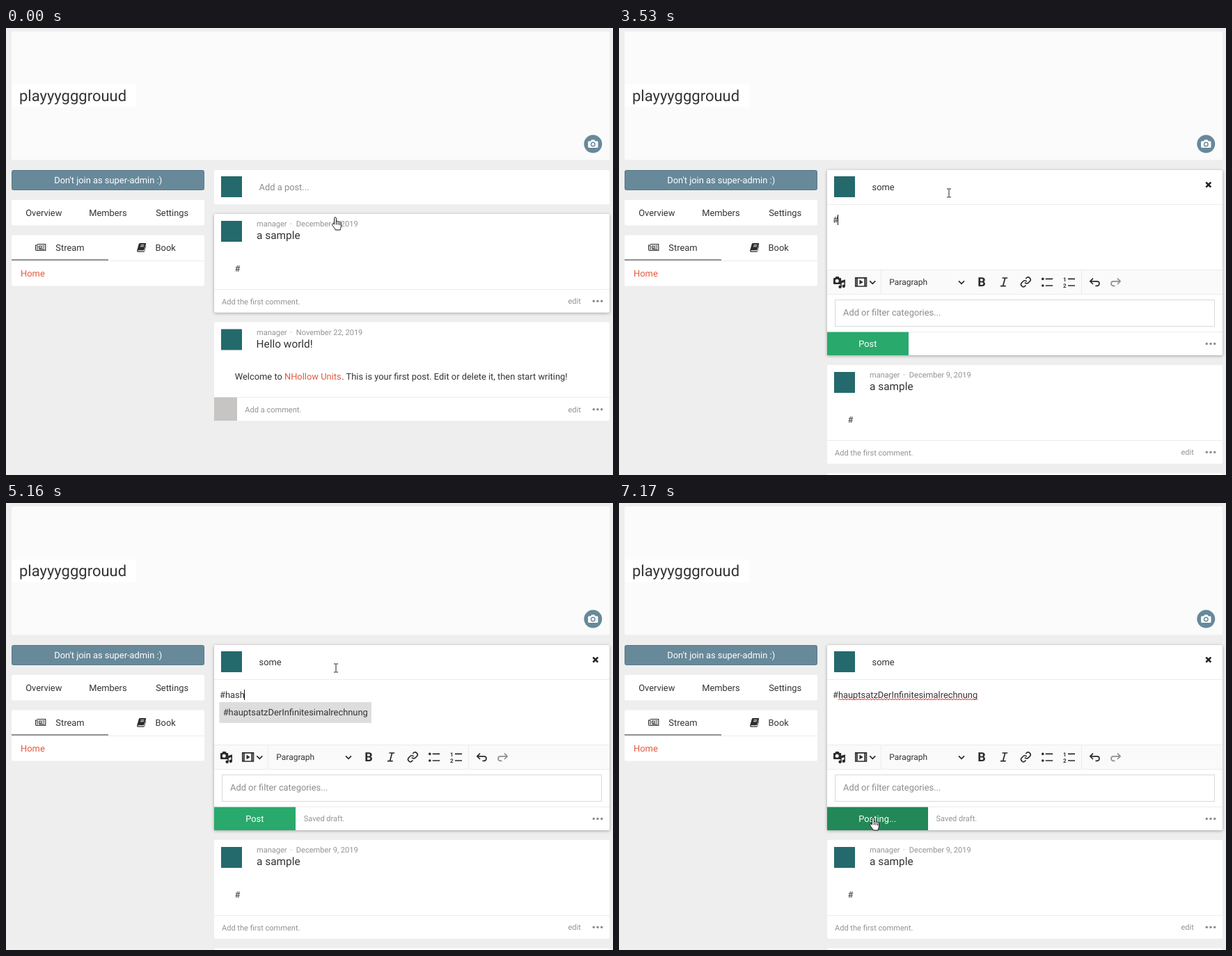
Animation, 872 px wide and 642 px high, one loop 8000 ms. Source, as an HTML page:

```html
<!DOCTYPE html>
<html lang="en">
<head>
<meta charset="utf-8">
<title>Posting with a hashtag</title>
<style>
html, body { margin: 0; width: 100%; height: 100%; overflow: hidden; background: #eee; }
svg { display: block; width: 872px; height: 642px; }
text { font: 12.88px Roboto, "Open Sans", sans-serif; fill: #333; text-rendering: geometricPrecision; white-space: pre; }
.small { font-size: 11.04px; fill: #939393; }
.head { font-size: 15.4px; }
.hint { fill: #8c8c8c; }
.mid { text-anchor: middle; }
.on-dark { fill: #fff; }
.link { fill: #e4593c; }
.card { fill: #fff; }
.raised { filter: drop-shadow(0 1px 2px rgba(0, 0, 0, .32)); }
.rule { fill: #ececec; }
.logo { fill: #24696b; }
.dots { fill: #8a8a8a; }
.icon { fill: none; stroke: #2b2b2b; stroke-width: 1.7; }
.solid { fill: #2b2b2b; }
.off { stroke: #8f8f8f; }
</style>
</head>
<body>
<svg viewBox="0 0 872 642">
  <defs>
    <g id="dots" class="dots"><circle cx="844.3" r="1.7"/><circle cx="850" r="1.7"/><circle cx="855.7" r="1.7"/></g>
    <path id="chevron" class="icon" d="M-4-2L0 2L4-2"/>
    <path id="turn" d="M681 359.6L676.9 363.8L681 368M677 363.8H686.5c4.6 0 4.6 6.6 0 6.6H684.5"/>
    <g id="byline">
      <rect class="logo" x="309" y="277" width="30" height="30"/>
      <text class="small" x="360" y="285">manager</text>
      <text class="small" x="408" y="285">·</text>
    </g>
  </defs>
  <rect width="872" height="642" fill="#eee"/>

  <!-- banner -->
  <rect x="8" y="5" width="859" height="184.5" rx="2" fill="#fbfbfb"/>
  <rect class="card" x="8" y="81" width="179" height="33"/>
  <text x="19" y="105" style="font-size:22px">playyygggrouud</text>
  <circle cx="843.3" cy="166.6" r="13" fill="#67899a"/>
  <path fill="#fff" d="M837.5 162.5h2.5l1.2-2h4.2l1.2 2h2.5q1.4 0 1.4 1.4v6.7q0 1.4-1.4 1.4h-11.6q-1.4 0-1.4-1.4v-6.7q0-1.4 1.4-1.4z"/>
  <circle cx="843.3" cy="167" r="2.8" fill="#fff" stroke="#67899a" stroke-width="1.4"/>

  <!-- sidebar -->
  <rect x="8.5" y="204.5" width="276" height="28" rx="2" fill="#67899a" stroke="#587988"/>
  <text class="mid on-dark" x="146.7" y="222.7">Don't join as super-admin :)</text>
  <rect class="card" x="8" y="247" width="277" height="36.5" rx="2"/>
  <text x="28.2" y="270">Overview</text>
  <text x="119.2" y="270">Members</text>
  <text x="215.2" y="270">Settings</text>
  <rect class="card" x="8" y="297.5" width="277" height="73" rx="2"/>
  <rect class="rule" x="8" y="334" width="277" height="1"/>
  <rect x="8" y="332" width="139" height="2" fill="#949494"/>
  <path class="icon" style="stroke-width:1.1" d="M45 310.5H56.8V319.5H44q-1.5 0-1.5-1.5V312H45V318.5M47.5 313h3.3v3h-3.3zM52.3 312.8h3M52.3 315h3M47.3 317.6h8"/>
  <text x="71.3" y="320">Stream</text>
  <path class="solid" d="M192 309h8.5q1 0 .7 1l-2.6 8.3q-.3 1-1.3 1h-7q-.9 0-.9.6t.9.6h7.5q.7 0 .9-.6l2.3-7.4q.5.3.3 1l-2.1 7q-.4 1.3-1.6 1.3h-7.4q-2.4 0-2-2.3l2.5-9q.4-1.5 1.3-1.5z"/>
  <path stroke="#fff" stroke-width=".9" d="M193.5 311.7h5M192.9 313.8h5"/>
  <text x="214.6" y="320">Book</text>
  <text class="link" x="21.1" y="357">Home</text>

  <!-- posts -->
  <g id="feed">
    <rect id="first" class="card" x="299" y="267" width="568" height="141.7" rx="2"/>
    <use href="#byline"/>
    <text class="small" x="416.8" y="285">December 9, 2019</text>
    <text class="head" x="360" y="303.4">a sample</text>
    <text x="328.6" y="350">#</text>
    <rect class="rule" x="299" y="375" width="568" height="1"/>
    <text class="small" x="310" y="397">Add the first comment.</text>
    <text class="small" x="807.5" y="396">edit</text>
    <use href="#dots" y="392.3"/>

    <rect class="card" x="299" y="422.5" width="568" height="141.5" rx="2"/>
    <use href="#byline" y="155.5"/>
    <text class="small" x="416.8" y="440.5">November 22, 2019</text>
    <text class="head" x="359.6" y="459">Hello world!</text>
    <text x="328.8" y="505">Welcome to</text>
    <text class="link" x="400" y="505">NHollow Units</text>
    <text x="482.2" y="505">. This is your first post. Edit or delete it, then start writing!</text>
    <rect class="rule" x="299" y="530" width="568" height="1"/>
    <rect x="299" y="530.5" width="33" height="33.5" fill="#c6c5c4"/>
    <text class="small" x="343.3" y="552">Add a comment.</text>
    <text class="small" x="807.5" y="551.5">edit</text>
    <use href="#dots" y="547.8"/>
  </g>

  <!-- composer -->
  <rect id="panel" class="card" x="299" y="204" width="568" height="49" rx="2"/>
  <rect class="logo" x="309" y="213" width="30" height="30"/>
  <text id="title" x="363.6" y="233"></text>
  <g id="editor">
    <rect class="rule" x="299" y="253" width="568" height="1"/>
    <path stroke="#222" stroke-width="2.6" d="M843.3 221.7l7 7M850.3 221.7l-7 7"/>
    <text id="body" x="307" y="280"></text>
    <path id="squiggle" fill="none" stroke="#e5322d" stroke-width="1"/>

    <rect x="299" y="347" width="568" height="36" fill="#fafafa"/>
    <path class="rule" d="M299 347h568v1h-568zM299 382h568v1h-568zM376 348h1v34h-1zM664 348h1v34h-1z"/>
    <path class="solid" d="M308 359h2.4l1-2h4.2l1 2h1.6q1 0 1 1v7q0 1-1 1h-9.2q-1 0-1-1v-7q0-1 1-1z"/>
    <circle cx="313.2" cy="363.3" r="2.5" fill="#fafafa"/>
    <path class="solid" d="M318.3 363.2l6.7-2v9.6h-1.5v-5.6l-3.7 1.1v5.4h-1.5z"/>
    <circle class="solid" cx="317.6" cy="371.8" r="2.2"/><circle class="solid" cx="322.8" cy="370.8" r="2.2"/>
    <path class="icon" d="M339.8 358.8h15.6v12.2h-15.6zM342 359v12M353.2 359v12"/>
    <path class="solid" d="M345.5 361.5l5.2 3.4-5.2 3.4z"/>
    <use href="#chevron" x="364.3" y="365.3"/>
    <text x="388.3" y="369" style="font-size:12px">Paragraph</text>
    <use href="#chevron" x="492" y="365.3"/>
    <text class="solid" x="515.3" y="371.3" style="font-size:18px;font-weight:700">B</text>
    <path class="icon" d="M550.5 359h7.7M548 370.7h7.7M554.7 359l-3.2 11.7"/>
    <path class="icon" style="stroke-width:2.3" transform="translate(576.2 356.7) scale(.68)" d="M10 13a5 5 0 0 0 7.54.54l3-3a5 5 0 0 0-7.07-7.07l-1.72 1.71M14 11a5 5 0 0 0-7.54-.54l-3 3a5 5 0 0 0 7.07 7.07l1.71-1.71"/>
    <path class="icon" d="M612.7 360.4h10.5M612.7 370h10.5M645 360.4h10M645 370h10"/>
    <circle class="solid" cx="608.8" cy="360.4" r="1.8"/><circle class="solid" cx="608.8" cy="370" r="1.8"/>
    <text x="638" y="363.5" style="font-size:8px;font-weight:700">1</text>
    <text x="638" y="373" style="font-size:8px;font-weight:700">2</text>
    <use id="undo" class="icon" href="#turn"/>
    <use class="icon off" href="#turn" transform="translate(1397 0) scale(-1 1)"/>

    <rect x="310.5" y="390.5" width="545" height="38" fill="#fff" stroke="#d9d9d9"/>
    <text class="hint" x="322" y="412.5">Add or filter categories...</text>
    <rect class="rule" x="299" y="436" width="568" height="1"/>
    <rect id="send" x="299" y="436.7" height="33.3"/>
    <text id="sendText" class="on-dark" x="344.2" y="458"></text>
    <text id="saved" class="small" y="457">Saved draft.</text>
    <use href="#dots" y="453.5"/>
  </g>

  <g id="list">
    <rect id="listBox" x="306.5" y="286" width="218.5" fill="#eee"/>
    <rect x="306.5" y="286" width="218.5" height="29.8" fill="#ddd"/>
  </g>
  <rect id="caret" width="1" height="15" fill="#111"/>

  <g id="cursor">
    <path id="hand" fill="#fff" stroke="#111" stroke-linejoin="round" d="M-3.4 1V-7.7a1.4 1.4 0 0 1 2.8 0V-2.8c.3-1 2.4-1 2.6.3c.4-.9 2.2-.8 2.4.5c.5-.8 2-.6 2 .8V3.5c0 2.5-1.2 3-1.2 5.5H-1.8c0-2-4-5-4.6-7.5c-.4-1.6 1.3-2.2 3-.5zM-.6-2.8V1.5M2-2V1.7M4.4-1.2V2"/>
    <path id="beam" fill="none" stroke="#222" d="M-3-6H-.7L0-5.4L.7-6H3M0-5.4V5.4M-3 6H-.7L0 5.4L.7 6H3"/>
    <path id="arrow" fill="#fff" stroke="#111" d="M-5-8V6l3.2-3L.3 8l2.2-1L.4 2.2H5z"/>
  </g>
</svg>
<script>
const LOOP = 8000, ROW = 29.86;
const $ = id => document.getElementById(id);
const MAIN = '#hauptsatzDerInfinitesimalrechnung';
const TAGS = ['#challenges', '#chats', '#halbwertszeit', MAIN, '#wahrscheinlichkeitmasse',
  '#hebbareUnstetigkeit', '#natuerlicheLogarithmusfunktion', '#sachaufgaben', '#gleichungen'];

// Each track lists [start time, value]; a value holds until the next start.
const tracks = {
  title: [[0, ''], [1980, 's'], [2060, 'so'], [2290, 'som'], [2370, 'some']],
  body: [[0, ''], [3530, '#'], [3700, '#h'], [3940, '#ha'], [4080, '#has'], [5080, '#hash'], [6250, MAIN]],
  caret: [[0, ''], [990, 'title'], [1540, ''], [1980, 'title'], [2840, ''], [2930, 'body'], [3390, ''],
    [3530, 'body'], [4620, ''], [5080, 'body'], [5620, ''], [6090, 'body'], [6800, '']],
  rows: [[0, 0], [3780, 9], [4170, 7], [5160, 1], [6320, 0]],
  cursor: [[0, 'hand 475 281'], [70, 'hand 481 279'], [150, 'hand 482 271'], [230, 'arrow 476 259'],
    [310, 'beam 467 243'], [390, 'beam 465 232'], [470, 'beam 474 237'],
    [5700, 'beam 466 254'], [5780, 'beam 453 272'], [5850, 'beam 445 282'],
    [6010, 'hand 439 297'], [6090, 'hand 437 305'], [6170, 'hand 436 308'],
    [6470, 'beam 425 330'], [6550, 'hand 405 375'], [6630, 'hand 382 428'],
    [6720, 'hand 366 460'], [6800, 'hand 360 474'], [6940, 'hand 362 470'], [7020, 'hand 365 464'],
    [7100, 'hand 367 461']]
};
const at = (name, t) => tracks[name].findLast(step => step[0] <= t)[1];
const show = (id, on) => { $(id).style.display = on ? '' : 'none'; };
const set = (id, attrs) => { for (const k in attrs) $(id).setAttribute(k, attrs[k]); };
const write = (id, text) => { if ($(id).textContent !== text) $(id).textContent = text; };

const rowTexts = TAGS.map((tag, i) => {
  const row = document.createElementNS('http://www.w3.org/2000/svg', 'text');
  row.setAttribute('x', 311.7);
  row.setAttribute('y', 305 + i * ROW);
  return $('list').appendChild(row);
});

let wave = 'M315 283';
for (let x = 317, up = true; x <= 515; x += 2, up = !up) wave += `L${x} ${up ? 281 : 283}`;
set('squiggle', { d: wave });

function field(id, text, hint) {
  write(id, text || hint);
  $(id).classList.toggle('hint', !text);
}

function render(t) {
  const open = t >= 990, posting = t >= 7170;
  set('feed', { transform: `translate(0 ${open ? 217 : 0})` });
  $('first').classList.toggle('raised', !open);
  set('panel', { height: open ? 266 : 49 });
  $('panel').classList.toggle('raised', t >= 1070);
  show('editor', open);

  const text = { title: at('title', t), body: at('body', t) };
  field('title', text.title, open ? 'Add post title here...' : 'Add a post...');
  field('body', text.body, t < 2930 ? 'Here goes the content...' : '');
  show('squiggle', t >= 6470);
  $('undo').classList.toggle('off', !text.body);

  const focus = at('caret', t);
  show('caret', focus);
  if (focus) {
    const length = text[focus] ? $(focus).getComputedTextLength() : 0;
    set('caret', focus === 'title'
      ? { x: Math.floor(363.4 + length), y: 221 }
      : { x: Math.floor(306.4 + length), y: 268 });
  }

  const count = at('rows', t);
  show('list', count);
  set('listBox', { height: count === 9 ? 275 : count * ROW });
  rowTexts.forEach((row, i) => {
    row.textContent = i >= count ? '' : count === 1 ? MAIN : TAGS[i];
  });

  set('send', { width: posting ? 145 : 117, fill: t >= 6720 ? '#228857' : '#29a96c' });
  write('sendText', posting ? 'Posting...' : 'Post');
  set('saved', { x: posting ? 455.5 : 427.8 });
  show('saved', t >= 5080);

  const [kind, x, y] = at('cursor', t).split(' ');
  for (const shape of ['hand', 'beam', 'arrow']) show(shape, shape === kind);
  set('cursor', { transform: `translate(${x} ${y})` });
}

const start = performance.now();
function tick() {
  render((performance.now() - start) % LOOP);
  requestAnimationFrame(tick);
}
tick();
</script>
</body>
</html>
```
